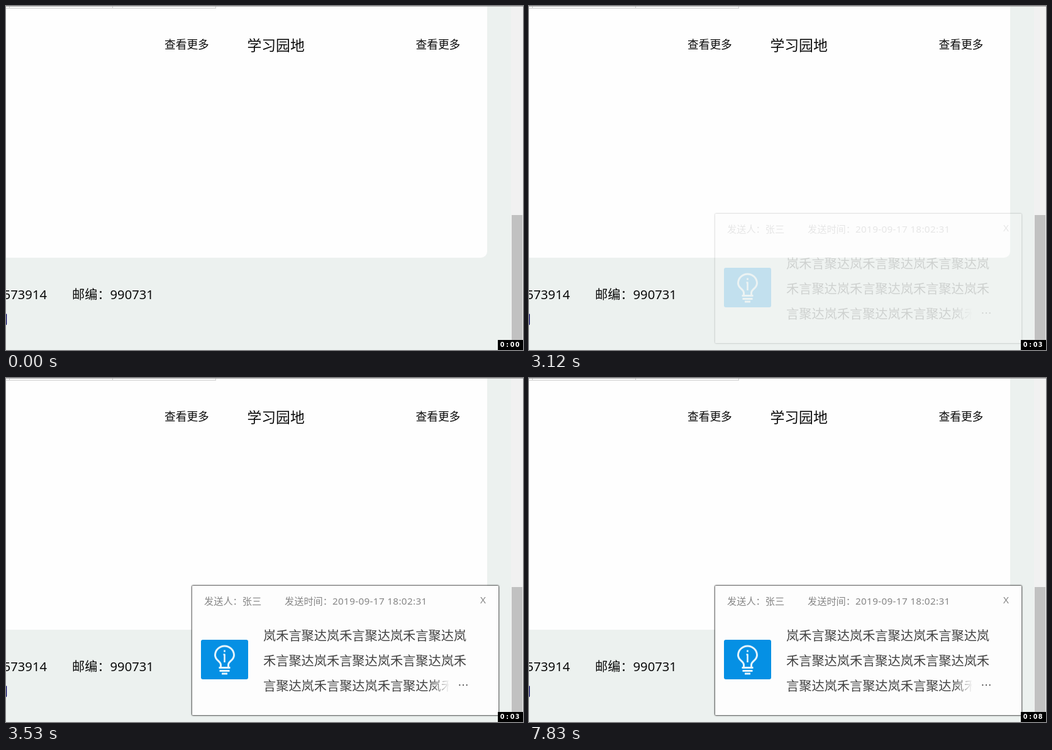
Recreate the animation shown at these times as an HTML page. Size 822x548 px, loop 8000 ms.

```html
<!DOCTYPE html>
<html lang="zh-CN">
<head>
<meta charset="utf-8">
<title>消息提醒</title>
<style>
html, body { margin: 0; width: 822px; height: 548px; overflow: hidden; }
svg { display: block; }
text { font: 20.2px "Noto Sans", "Noto Sans CJK SC", "Noto Sans CJK", sans-serif; fill: #0a0a0a; white-space: pre; }
.more { font-size: 17.7px; }
.title { font-size: 22.8px; }
.head text { font-size: 15.2px; fill: #858585; }
.head .date { letter-spacing: .37px; }
.body text { fill: #444; }
.body .cut { fill: url(#fade); }
.body .dots { font: 17px "Noto Sans CJK SC", "Noto Sans CJK", sans-serif; }
#panel { fill: #fdfdfd; filter: drop-shadow(0 0 1.2px #000) drop-shadow(0 0 1px #0009); }
#clock { font: bold 9.6px "DejaVu Sans", sans-serif; fill: #fff; }
</style>
</head>
<body>
<svg width="822" height="548" viewBox="0 0 822 548">
  <defs>
    <linearGradient id="fade" gradientUnits="userSpaceOnUse" x1="676" y1="0" x2="705" y2="0">
      <stop stop-color="#444"/>
      <stop offset="1" stop-color="#444" stop-opacity="0"/>
    </linearGradient>
  </defs>

  <!-- page -->
  <rect width="822" height="548" fill="#ecf1ef"/>
  <rect x="-20" y="-20" width="785" height="421" rx="10" fill="#fefefe"/>
  <path d="M0 3.5H334M5.5 1V3M169.5 1V3M333.5 1V3" stroke="#ccc" fill="none"/>
  <text class="more" x="252" y="68.3">查看更多</text>
  <text class="title" x="383.5" y="71">学习园地</text>
  <text class="more" x="651.5" y="68.3">查看更多</text>
  <text x="65" y="467" text-anchor="end">573914</text>
  <text x="105" y="467">邮编：990731</text>
  <text x="3" y="507" text-anchor="end" style="fill:#000060">网</text>

  <!-- scrollbar -->
  <rect x="803" width="19" height="548" fill="#f1f1f1"/>
  <rect x="804" y="333" width="17" height="215" fill="#c1c1c1"/>
  <rect width="822" height="1" fill="#a3a3a3"/>

  <!-- message -->
  <rect id="panel" x="296" y="331" width="487" height="206" rx="1"/>
  <g id="message">
    <g class="head">
      <text x="315" y="361.3">发送人：张三</text>
      <text x="443" y="361.3">发送时间：</text>
      <text class="date" x="519" y="361.3">2019-09-17 18:02:31</text>
      <text x="754" y="359">X</text>
    </g>
    <rect x="310" y="417" width="75" height="63" rx="3" fill="#0590e4"/>
    <g fill="none" stroke="#e4f4fc" stroke-width="3" stroke-linejoin="round">
      <path d="M341.5 460V457C341.5 451 332.5 450 332.5 441.5A15 14.500 0 0 1 362.500 441.500C362.500 450 353.500 451 353.500 457V460"/>
      <path d="M338.500 461.500H356.500M339.500 466.500H355.500M343 471H352"/>
      <path d="M345.500 440.500H347.500V453M347.500 433.500V436.500" stroke-width="2.600"/>
    </g>
    <g class="body" id="lines">
      <text class="dots" x="718.5" y="495.5">…</text>
    </g>
  </g>

  <rect x="782" y="532" width="40" height="16"/>
  <text id="clock" x="785.8 795.2 801.8 809.8" y="543">0:00</text>
</svg>
<script>
const LOOP = 8000;
const ticks = [940, 1930, 2840, 3840, 4840, 5840, 6800, 7830];
// start time, panel opacity, content opacity
const fades = [[0, 0, 0], [3120, .19, .19], [3260, .9, .7], [3380, .98, .92], [3530, 1, 1]];
const get = id => document.getElementById(id);
const panel = get('panel'), message = get('message'), clock = get('clock');

const phrase = '岚禾言聚达'.repeat(10);
[[0, 16], [16, 32], [32, 47]].forEach(([from, to], row) => {
  const line = document.createElementNS('http://www.w3.org/2000/svg', 'text');
  line.setAttribute('x', 409);
  line.setAttribute('y', 418 + 40 * row);
  if (row === 2) line.setAttribute('class', 'cut');
  line.textContent = phrase.slice(from, to);
  get('lines').append(line);
});

function draw(now) {
  const t = now % LOOP;
  const [, back, front] = fades.filter(f => f[0] <= t).pop();
  panel.style.opacity = back;
  message.style.opacity = front;
  clock.textContent = '0:0' + ticks.filter(s => s <= t).length;
}

const start = performance.now();
function loop() {
  draw(performance.now() - start);
  requestAnimationFrame(loop);
}
loop();
</script>
</body>
</html>
```
